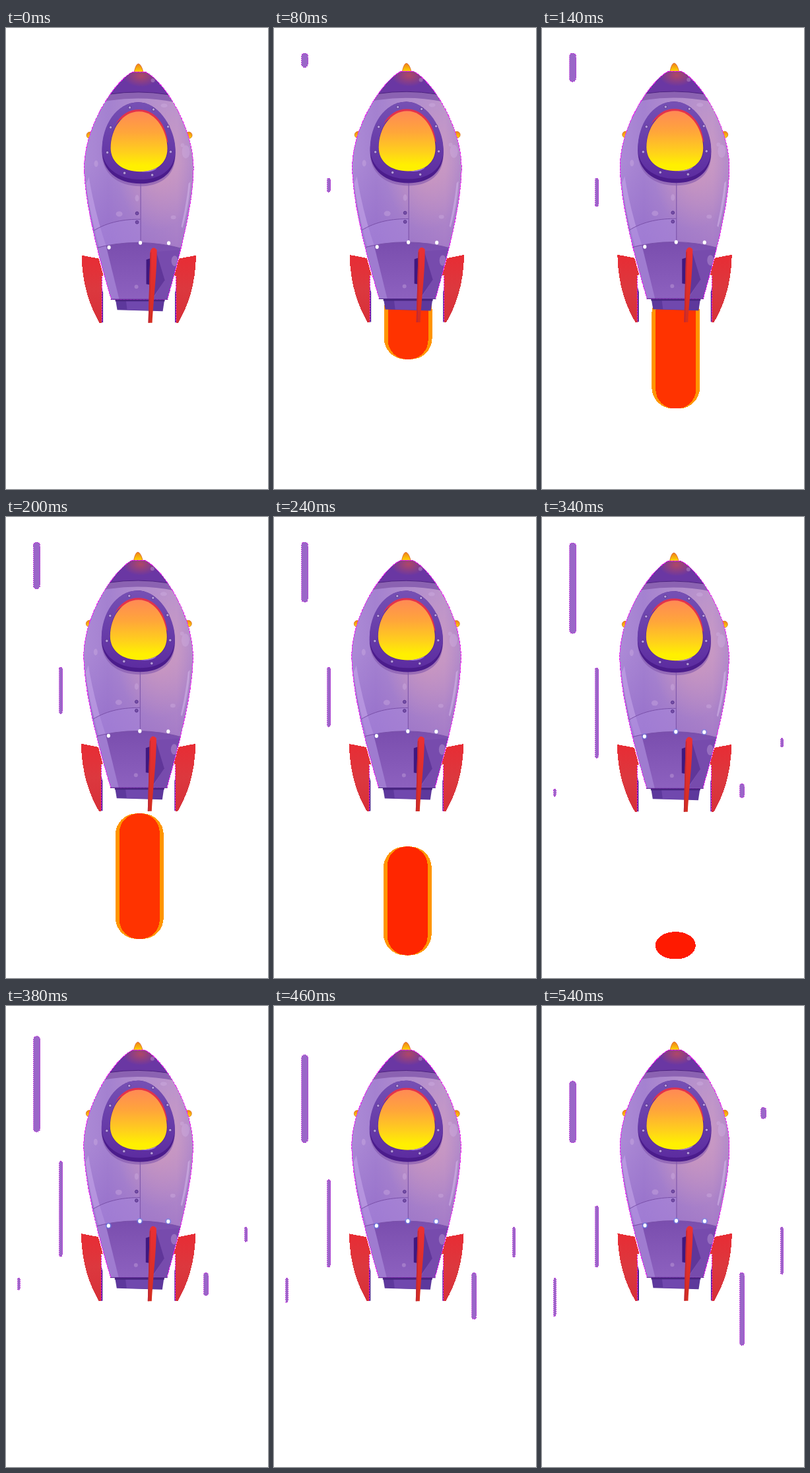
An HTML page that plays this animation: 397 by 697 pixels, repeating every 0.56 s.

```html
<!DOCTYPE html>
<html lang="en">
<head>
<meta charset="utf-8">
<title>Rocket</title>
<style>
  html, body { margin: 0; width: 100%; height: 100%; overflow: hidden; background: #fff; }
  svg { display: block; width: 397px; height: 697px; }
  .crisp { shape-rendering: crispEdges; }
</style>
</head>
<body>
<svg viewBox="0 0 397 697">
  <defs>
    <linearGradient id="hull">
      <stop offset="0" stop-color="#ac8ad6"/><stop offset=".22" stop-color="#a481d0"/>
      <stop offset=".5" stop-color="#b18dcd"/><stop offset=".85" stop-color="#bd95cb"/>
      <stop offset="1" stop-color="#ae88cc"/>
    </linearGradient>
    <linearGradient id="shade" x2="0" y2="1">
      <stop offset=".4" stop-color="#8054c4" stop-opacity="0"/><stop offset="1" stop-color="#7d50bf" stop-opacity=".6"/>
    </linearGradient>
    <linearGradient id="skirt" x2="0" y2="1">
      <stop offset="0" stop-color="#7a4eae"/><stop offset="1" stop-color="#8e62c0"/>
    </linearGradient>
    <radialGradient id="warm">
      <stop offset="0" stop-color="#e0a0b4" stop-opacity=".55"/><stop offset="1" stop-color="#e0a0b4" stop-opacity="0"/>
    </radialGradient>
    <radialGradient id="tipGlow">
      <stop offset="0" stop-color="#c04a58" stop-opacity=".8"/><stop offset="1" stop-color="#c04a58" stop-opacity="0"/>
    </radialGradient>
    <linearGradient id="glass" x2="0" y2="1">
      <stop offset="0" stop-color="#ff8a55"/><stop offset=".35" stop-color="#ffa63a"/>
      <stop offset=".68" stop-color="#ffd01c"/><stop offset=".9" stop-color="#fff000"/>
    </linearGradient>
    <linearGradient id="ring" x2="0" y2="1">
      <stop offset="0" stop-color="#7650b4"/><stop offset="1" stop-color="#5c2ca0"/>
    </linearGradient>
    <linearGradient id="lamp" x2="0" y2="1">
      <stop offset="0" stop-color="#f0801a"/><stop offset="1" stop-color="#ffdc00"/>
    </linearGradient>
    <linearGradient id="fin" x2="0" y2="1">
      <stop offset="0" stop-color="#e82c34"/><stop offset=".5" stop-color="#dc383e"/><stop offset="1" stop-color="#d63038"/>
    </linearGradient>
    <linearGradient id="keel" x2="0" y2="1">
      <stop offset="0" stop-color="#ea3034"/><stop offset="1" stop-color="#d42e20"/>
    </linearGradient>
    <path id="body" d="M192 66C168 76 118 145 118 212C119 265 138 340 159 410H244C262 345 283 270 283.5 212C283 145 235 76 210 66Z"/>
    <path id="frame" d="M200 112C232 112 256 155 256 188C256 218 235 235 203 235C168 235 145 215 145 186C145 150 166 112 200 112Z"/>
    <clipPath id="inBody"><use href="#body"/></clipPath>
  </defs>

  <g id="streaks" class="crisp" fill="#9a66c8" stroke="#c040dc" stroke-dasharray="2 1"></g>

  <g id="ship">
    <g class="crisp">
      <rect id="outer" x="166" width="73" rx="32" fill="#ff9500"/>
      <rect id="inner" x="172" width="61" rx="29"/>
    </g>

    <path d="M193.500 67C195 60 197 54 200 54S206 60 207.500 67Z" fill="url(#lamp)" stroke="#d04a20" stroke-width=".7"/>
    <g fill="url(#lamp)" stroke="#d0601c" stroke-width=".7">
      <circle cx="126.500" cy="162" r="5"/><circle cx="276.500" cy="162" r="5"/>
    </g>
    <path d="M165 408H240L237 428L168 426Z" fill="#5d389c"/>
    <path d="M181 410H222L220 427L183 426Z" fill="#7048ae"/>
    <path d="M165 409H240V413H165Z" fill="#48257f"/>

    <use href="#body" fill="url(#hull)"/>
    <g clip-path="url(#inBody)">
      <use href="#body" fill="url(#shade)"/>
      <ellipse cx="230" cy="210" rx="62" ry="95" fill="url(#warm)"/>
      <path d="M112 120Q200 92 290 121V60H112Z" fill="#8b62b2"/>
      <path d="M112 110Q200 83 290 111V60H112Z" fill="#6a37a3"/>
      <path d="M112 110Q200 83 290 111" fill="none" stroke="#4d237f"/>
      <ellipse cx="204" cy="72" rx="27" ry="17" fill="url(#tipGlow)"/>
      <path d="M121 235Q127 285 142 335H153Q134 280 125 225Z" fill="#c5a5ea" opacity=".6"/>
      <path d="M131 307C155 292 180 289 203 289V325Q170 326 138 333Z" fill="#a886da" opacity=".55"/>
      <path d="M130 334Q200 314 272 335V415H130Z" fill="url(#skirt)"/>
      <path d="M136 333L151 329L171 410H157Z" fill="#9f7bd0"/>
      <path d="M226 338L239 382L222 409H246L268 335Z" fill="#774bad"/>
      <path d="M227 338L240 381L221 409Z" fill="#603699"/>
      <g fill="none" stroke="#7950a8">
        <path d="M130 334Q200 314 272 335M131 307C155 292 180 289 203 289M203.500 235V325"/>
      </g>
      <g fill="#d4b5e6" opacity=".35">
        <ellipse cx="272" cy="187" rx="6" ry="10"/><ellipse cx="171" cy="281" rx="5" ry="4"/>
        <ellipse cx="198" cy="257" rx="3" ry="5"/><ellipse cx="255" cy="352" rx="5" ry="8"/>
        <ellipse cx="239" cy="117" rx="5" ry="3"/><ellipse cx="136" cy="205" rx="3" ry="5"/>
        <ellipse cx="253" cy="286" rx="4" ry="3"/><circle cx="197" cy="391" r="3"/>
        <circle cx="222" cy="79" r="3"/><circle cx="267" cy="177" r="3"/>
      </g>
      <path d="M279 232Q277 268 267 302L265 300Q273 265 276 235Z" fill="#dcc4f0" opacity=".45"/>
    </g>
    <use href="#body" class="crisp" fill="none" stroke="#f01cf4" stroke-dasharray="4 1"/>
    <path d="M158 410H245" stroke="#50298a"/>

    <use href="#frame" y="4" fill="#8258ae" opacity=".6"/>
    <use href="#frame" fill="#4b1c8c"/>
    <use href="#frame" transform="translate(0 5.600) scale(1 .95)" fill="url(#ring)"/>
    <path d="M201 124.500C229 124.500 245 157 245 182C245 205 227 217.500 203 217.500C176 217.500 157.500 204 157.500 181C157.500 151 176 124.500 201 124.500Z" fill="#5a2398"/>
    <path d="M165 146C173 131 185 123 201 123C225 123 242 145 245 174L236 160C221 130 185 121 165 146Z" fill="#e2324c"/>
    <path d="M201 126C228 126 244 158 244 182C244 205 226 217 203 217C176 217 158 203 158 181C158 152 176 126 201 126Z" fill="url(#glass)"/>
    <path d="M204 217Q219 216 229 211Q222 219 204 217Z" fill="#a783d4"/>
    <g id="rivets" fill="#b69cdb" stroke="#47217f" stroke-width=".7"></g>

    <g id="bolts"></g>

    <path d="M144 390V445H146.500V400Z" fill="#4a1b88"/>
    <path d="M258 390V445H255.500V400Z" fill="#4a1b88"/>
    <g class="crisp" fill="url(#fin)">
      <path id="wing" d="M114 343.500L140 348.500L147 374L144 375L144.500 445.500H141C127 421 115 390 114 343.500Z"/>
      <use href="#wing" transform="translate(401.500 0) scale(-1 1)"/>
    </g>
    <path class="crisp" d="M144.500 376V445M257 376V445" stroke="#e21ef0" stroke-dasharray="3 1"/>
    <path d="M212 350L218 348V388L212 387Z" fill="#40187f"/>
    <path d="M218 337Q222 328.500 228 335C228.500 365 223 410 221 445.500H215C216 410 217 370 218 337Z" fill="url(#keel)"/>
    <path d="M218 340C217 370 216 410 215 445.500H217C217.500 410 219 370 219.500 338Z" fill="#c02834"/>
  </g>
</svg>
<script>
const LOOP = 560, GROW = 475;
const $ = id => document.getElementById(id);
const clamp = v => Math.min(1, Math.max(0, v));
const ease = v => { v = clamp(v); return v * v * (3 - 2 * v); };
const mix = (a, b, v) => a + (b - a) * v;

function add(parent, tag, attrs) {
  const el = document.createElementNS("http://www.w3.org/2000/svg", tag);
  for (const k in attrs) el.setAttribute(k, attrs[k]);
  return parent.appendChild(el);
}

function span(el, top, bottom, visible) {
  el.setAttribute("y", top);
  el.setAttribute("height", Math.max(0, bottom - top));
  el.setAttribute("visibility", visible && bottom > top ? "visible" : "hidden");
}

const rivets = [[187, 120], [223, 123], [245, 149], [249, 187], [221, 222], [179, 219], [153, 188], [158, 150]];
for (const [cx, cy] of rivets) add($("rivets"), "circle", { cx, cy, r: 2.2 });
for (const cy of [280, 293.5]) add($("rivets"), "circle", { cx: 198, cy, r: 2.4, fill: "#7650a8" });

const glows = [[155.5, 331.5], [203, 324.5], [246, 325]].map(([cx, cy]) => {
  const glow = add($("bolts"), "circle", { cx, cy, r: 4.5, fill: "#5c8cff" });
  add($("bolts"), "ellipse", { cx, cy, rx: 2.6, ry: 3, fill: "#fff" });
  return glow;
});

// left, width, top, full length, delay
const streaks = [
  [41, 11, 38, 169, 0], [80, 6, 227, 168, 0],
  [299, 8, 403, 168, 260], [361, 5, 334, 109, 260], [17, 4.5, 411, 89, 260],
  [331, 9, 153, 290, 520]
].map(([x, width, top, length, delay]) => ({
  top, length, delay,
  el: add($("streaks"), "rect", { x: x + .5, width: width - 1, rx: width / 2 })
}));

function draw(t) {
  for (const { el, top, length, delay } of streaks) {
    const local = t - delay;
    const head = .055 + .945 * ease(local / GROW);
    const tail = ease((local - 320) / GROW);
    span(el, top + length * tail, top + length * head, local > 5);
  }

  const flameTop = mix(395, 668, ease((t - 116) / 298));
  const flameEnd = mix(395, 668, ease((t + 57) / 324));
  span($("outer"), flameTop, flameEnd, t < 250);
  span($("inner"), flameTop, flameEnd, t < 370);
  $("inner").setAttribute("fill", `rgb(255,${mix(51, 26, clamp((t - 200) / 80))},0)`);

  const wave = shift => Math.cos(2 * Math.PI * (t - shift) / LOOP);
  $("ship").setAttribute("transform", `translate(${.9 * Math.max(0, wave(50)) - .2} ${-.8 * wave(160)})`);
  for (const g of glows) g.setAttribute("opacity", .45 * clamp((t - 200) / 180));
}

function tick(now) {
  draw(now % LOOP);
  requestAnimationFrame(tick);
}
draw(0);
requestAnimationFrame(tick);
</script>
</body>
</html>
```
